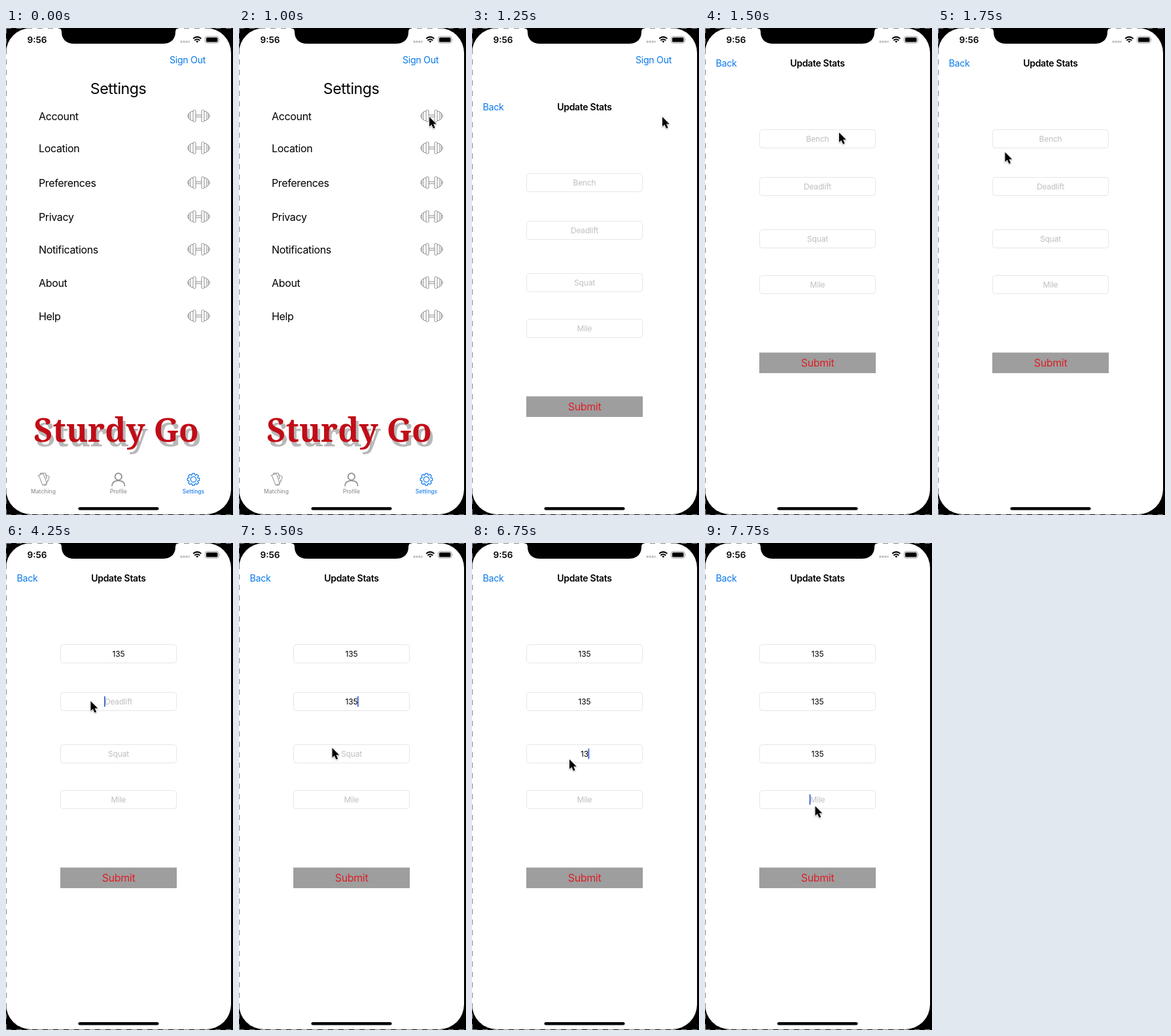
Animation, 347 px wide and 745 px high, one loop 8 s. Source, as an HTML page:

```html
<!DOCTYPE html>
<html lang="en">
<head>
<meta charset="utf-8">
<title>Settings</title>
<style>
  html, body { margin: 0; width: 100%; height: 100%; overflow: hidden; background: #000; }
  svg { display: block; width: 347px; height: 745px; }
  text { font-family: Inter, "Liberation Sans", sans-serif; }
  .mid { text-anchor: middle; }
  .link { font-size: 14.2px; letter-spacing: -.3px; fill: #0a7aec; }
  .row { font-size: 16px; letter-spacing: -.35px; }
  .tab { font-size: 8.5px; font-weight: 500; fill: #949494; }
  .head { font-size: 14px; font-weight: 600; letter-spacing: -.3px; }
  .entry { font-size: 12px; letter-spacing: -.2px; }
  .logo { font: bold 50px "Noto Serif", serif; }
  .icon { fill: none; stroke: #8c8c8c; stroke-width: 1; stroke-linejoin: round; }
  .blue { stroke: #1c80ea; }
  .tab.blue { fill: #1c80ea; stroke: none; }
</style>
</head>
<body>
<svg viewBox="0 0 347 745">
  <defs>
    <g id="bell" class="icon" stroke="#777">
      <path id="plates" d="M-4.500 -1.500V-7.500q0 -1.500 -1.500 -1.500h-1q-1.500 0 -1.500 1.500V7.500q0 1.500 1.500 1.500h1q1.500 0 1.500 -1.500V-1.500M-8.500 -7h-2.500q-1.500 0 -1.500 1.500V5.500q0 1.500 1.500 1.500h2.500M-12.500 -5h-1.500q-1 0 -1 1V4q0 1 1 1h1.500M-15 -2.500q-2 0 -2 2.500t2 2.500"/>
      <use href="#plates" transform="scale(-1 1)"/>
      <path d="M-4.500 -1.500H4.500M-4.500 1.500H4.500"/>
    </g>
  </defs>

  <rect width="347" height="745"/>
  <rect width="344" height="744" rx="38" fill="#fff"/>
  <path d="M.5 0V745M0 .5H347M0 744.500H347" fill="none" stroke="#888" stroke-dasharray="8 8"/>
  <path d="M79 0Q85 0 85 6C85 17 92 24 104 24H240C252 24 259 17 259 6Q259 0 265 0Z"/>

  <text class="mid" x="47.500" y="23" font-size="13.600" font-weight="600">9:56</text>
  <path d="M266.500 21h14" stroke="#bbb" stroke-width="3" stroke-dasharray="3 1"/>
  <g fill="none" stroke="#000" stroke-width="2">
    <path d="M286.200 16.300Q292.300 11 298.400 16.300M288.300 19Q292.300 15.600 296.300 19"/>
    <path d="M290.200 20.300Q292.300 18.700 294.400 20.300L292.300 22.600Z" fill="#000" stroke="none"/>
  </g>
  <rect x="304.500" y="13" width="20.500" height="10" rx="3" fill="none" stroke="#999"/>
  <rect x="306" y="14.500" width="17.500" height="7" rx="1.600"/>
  <path d="M326.300 16.300q1.500 1.700 0 3.400z" fill="#999"/>

  <text id="signOut" class="link" x="250" y="54">Sign Out</text>

  <g id="settings">
    <text class="mid" x="171.500" y="100.500" font-size="23.200" letter-spacing="-.5">Settings</text>
    <g id="rows"></g>
    <g class="logo mid">
      <text class="logo" x="172.500" y="640" fill="#b8b8b8">Sturdy Go</text>
      <text class="logo" x="168.500" y="633" fill="#c10d17">Sturdy Go</text>
    </g>
    <g class="icon">
      <path d="M50 684L57 681.500L62.500 697L56 699.500Z"/>
      <path d="M52.500 683V681H60.500L62 690M60.500 683.500L66.500 686.500L61 699.500L57.500 699.300M48.500 685.500L50 684M63 692l2 1"/>
      <g stroke-width="1.700">
        <circle cx="171.800" cy="686.300" r="5.200"/>
        <path d="M162 701Q162 692.500 171.800 692.500T181.600 701"/>
      </g>
      <g class="blue" stroke-width="1.300">
        <path id="gear"/>
        <circle cx="286.500" cy="690.500" r="4.200"/>
      </g>
    </g>
    <text class="tab mid" x="57" y="712">Matching</text>
    <text class="tab mid" x="171.800" y="712">Profile</text>
    <text class="tab blue mid" x="286.500" y="712">Settings</text>
  </g>

  <g id="stats">
    <text class="link" x="16.500" y="59">Back</text>
    <text class="head mid" x="172" y="59">Update Stats</text>
    <g id="fields"></g>
    <rect x="83" y="496.500" width="178" height="31.500" fill="#9e9e9e"/>
    <text class="row mid" x="172" y="518" fill="#dc2027">Submit</text>
    <rect id="caret" width="1.800" height="16" fill="#3e60d6"/>
  </g>

  <rect x="110.500" y="733" width="123" height="4.500" rx="2.250"/>
  <path id="pointer" d="M0 0V14.800L3.400 11.700L6 17.500L8.600 16.400L6.100 10.700H10.700Z" stroke="#fff" stroke-width="1.200" paint-order="stroke" style="filter:drop-shadow(0 1px 1px #0005)"/>
</svg>
<script>
  const LOOP = 8000, MID = 172;
  const OPEN = 1250, COLLAPSE = 1500;
  const $ = id => document.getElementById(id);
  const show = (el, on) => el.setAttribute('visibility', on ? 'inherit' : 'hidden');

  const rows = [['Account', 135], ['Location', 184], ['Preferences', 237], ['Privacy', 289],
    ['Notifications', 339], ['About', 390], ['Help', 441]];
  $('rows').innerHTML = rows.map(([name, y]) =>
    `<text class="row" x="50" y="${y + 5.5}">${name}</text><use href="#bell" x="294.500" y="${y - .5}"/>`).join('');

  // focus: caret arrives; type: first digit, one more each 250 ms
  const fields = [
    { name: 'Bench', y: 155.5, focus: 2250, type: 3000 },
    { name: 'Deadlift', y: 228.5, focus: 4250, type: 4750 },
    { name: 'Squat', y: 308.5, focus: 6000, type: 6500 },
    { name: 'Mile', y: 378.5, focus: 7750, type: LOOP }
  ];
  $('fields').innerHTML = fields.map(f =>
    `<rect x="83.500" y="${f.y}" width="177" height="28" rx="4" fill="#fff" stroke="#e6e6e6"/>
     <text class="entry mid" x="${MID}" y="${f.y + 18.5}"></text>`).join('');
  const entries = [...$('fields').querySelectorAll('text')];

  // time, x, y of the pointer tip
  const moves = [
    [250, 288, 51], [500, 293, 88], [750, 292, 122], [1000, 291, 136],
    [1500, 205, 160], [1750, 102.5, 190], [2000, 103.5, 177],
    [3750, 118, 212], [4000, 129.5, 242],
    [5500, 142.5, 313.5], [5750, 149, 331],
    [7250, 160, 372], [7500, 166, 398], [7750, 168.5, 402.5]
  ];

  const polar = (r, a) => `${286.5 + r * Math.cos(a)} ${690.5 + r * Math.sin(a)}`;
  let gear = '';
  for (let i = 0; i < 8; i++) {
    const a = i * Math.PI / 4;
    gear += [[7.2, -.3], [9.4, -.2], [9.4, .2], [7.2, .3]]
      .map(([r, d]) => (gear || d > -.3 || r > 8 ? 'L' : 'M') + polar(r, a + d)).join('');
  }
  $('gear').setAttribute('d', gear.replace(/^./, 'M') + 'Z');

  function draw(t) {
    show($('settings'), t < OPEN);
    show($('stats'), t >= OPEN);
    show($('signOut'), t < COLLAPSE);
    $('stats').setAttribute('transform', `translate(0 ${t < COLLAPSE ? 67 : 0})`);

    const move = moves.findLast(m => t >= m[0]);
    show($('pointer'), !!move);
    if (move) $('pointer').setAttribute('transform', `translate(${move[1]} ${move[2]})`);

    fields.forEach((f, i) => {
      const count = t < f.type ? 0 : Math.min(3, 1 + Math.floor((t - f.type) / 250));
      const text = count ? '135'.slice(0, count) : f.name;
      if (entries[i].textContent !== text) entries[i].textContent = text;
      entries[i].setAttribute('fill', count ? '#000' : '#bfbfbf');
      f.count = count;
    });

    const active = fields.findLastIndex(f => t >= f.focus);
    show($('caret'), active >= 0);
    if (active >= 0) {
      const f = fields[active], half = entries[active].getComputedTextLength() / 2;
      $('caret').setAttribute('x', f.count ? MID + half - .5 : MID - half - 1);
      $('caret').setAttribute('y', f.y + 6);
    }
  }

  const start = performance.now();
  function tick() {
    draw((performance.now() - start) % LOOP);
    requestAnimationFrame(tick);
  }
  tick();
</script>
</body>
</html>
```
